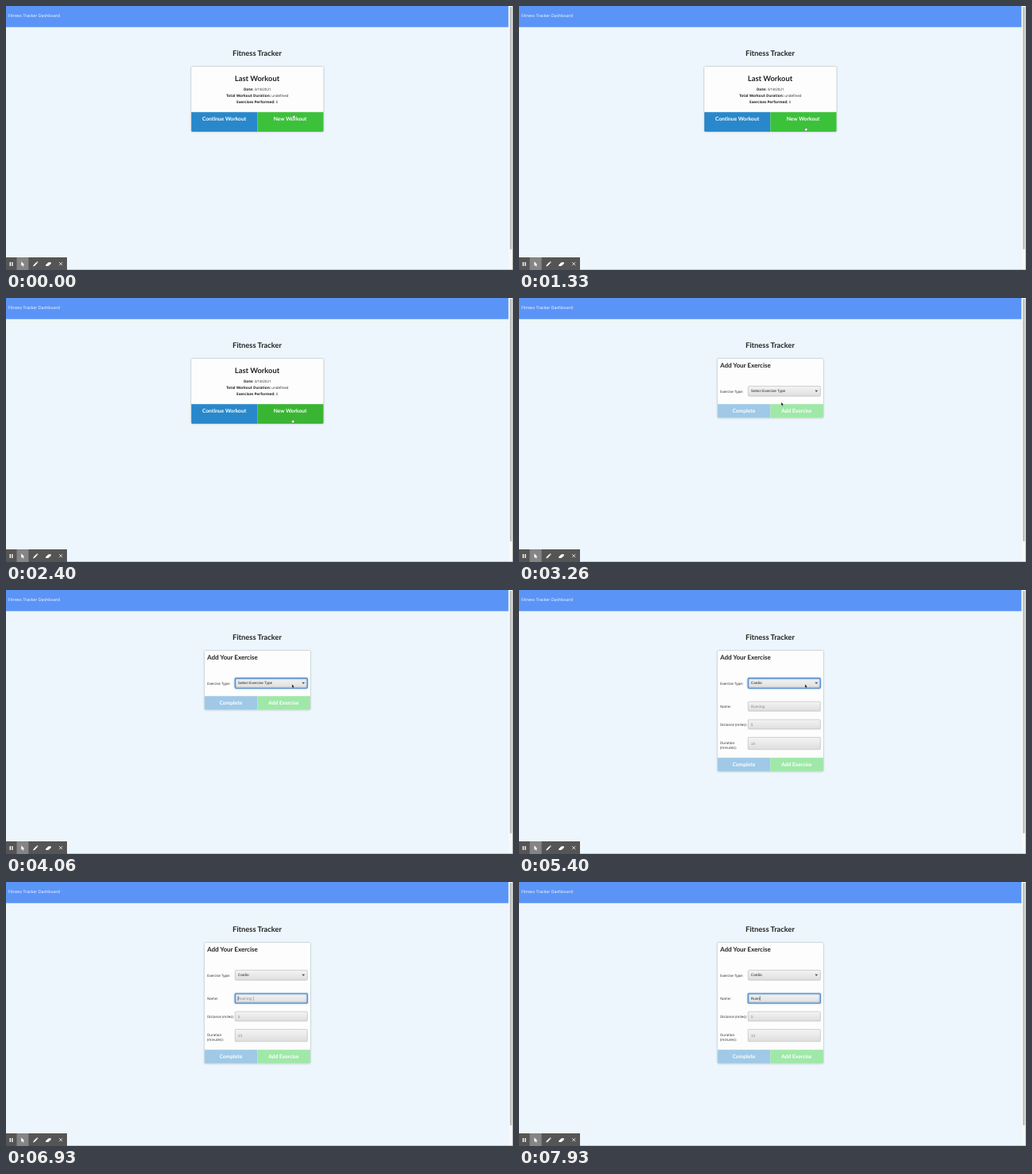
An HTML page that plays this animation: 640 by 334 pixels, repeating every 8 s.

```html
<!DOCTYPE html>
<html lang="en">
<head>
<meta charset="utf-8">
<title>Fitness Tracker</title>
<style>
html, body { margin: 0; width: 100%; height: 100%; overflow: hidden; background: #ecf6fc; }
svg { display: block; width: 640px; height: 334px; }
text { font: 4.45px "Open Sans", sans-serif; fill: #222; text-rendering: geometricPrecision; }
.mid { text-anchor: middle; }
.h1, .h2, .btn { font-family: Lato, sans-serif; font-weight: 700; }
.h1 { font-size: 9.33px; }
.h2 { font-size: 8px; }
.btn { font-size: 6.7px; fill: #fff; }
.bold { font-size: 4.67px; font-weight: 700; }
.nav { font-size: 5.27px; fill: #fff; }
.field { font: 4.67px "Liberation Sans", Arial, sans-serif; }
.hint { fill: #8a8a8a; }
.card { fill: #fdfdfd; filter: drop-shadow(0 .6px .9px #0005); }
.box { fill: url(#grey); stroke: #b4b4b4; stroke-width: .6; }
.focus { fill: none; stroke: #4a86c8; stroke-width: 1.1; filter: drop-shadow(0 0 .8px #5b9bd5); }
</style>
</head>
<body>
<svg viewBox="0 0 640 334">
  <defs>
    <linearGradient id="grey" x2="0" y2="1">
      <stop stop-color="#f4f4f4"/><stop offset="1" stop-color="#dedede"/>
    </linearGradient>
  </defs>
  <rect width="640" height="334" fill="#ecf6fc"/>
  <rect width="634.5" height="26.7" fill="#5b94f7"/>
  <text class="nav" x="3" y="14">Fitness Tracker Dashboard</text>
  <text class="h1 mid" x="317" y="62.8">Fitness Tracker</text>

  <g id="summary">
    <rect class="card" x="234" y="77" width="166.7" height="82" rx="1.3"/>
    <text class="h1 mid" x="317" y="94.5">Last Workout</text>
    <text class="mid" x="317.2" y="106.7"><tspan class="bold">Date:</tspan> 3/18/2021</text>
    <text class="mid" x="317.2" y="114.7"><tspan class="bold">Total Workout Duration:</tspan> undefined</text>
    <text class="mid" x="317.2" y="122.7"><tspan class="bold">Exercises Performed:</tspan> 0</text>
    <path d="M234 134.3h83.3V159h-82a1.3 1.3 0 0 1-1.3-1.3z" fill="#2988cb"/>
    <path id="create" d="M317.3 134.3h83.4v23.4a1.3 1.3 0 0 1-1.3 1.3h-82.1z"/>
    <text class="btn mid" x="275.5" y="145.3">Continue Workout</text>
    <text class="btn mid" x="358.7" y="145.3">New Workout</text>
  </g>

  <g id="form">
    <rect id="panel" class="card" x="250.7" y="77" width="133.3" rx="1.3"/>
    <text class="h2" x="254" y="88">Add Your Exercise</text>
    <text x="254" y="119.7">Exercise Type:</text>
    <rect class="box" x="289.2" y="111.6" width="91.2" height="12.6" rx="1.4"/>
    <rect id="selectFocus" class="focus" x="289.2" y="111.6" width="91.2" height="12.6" rx="1.4"/>
    <text id="kind" class="field" x="292.8" y="119.4"></text>
    <path d="M373.4 116.8h4l-2 2.3z" fill="#555"/>
    <g id="cardio">
      <text x="254" y="149.1">Name:</text>
      <text x="254" y="171.8">Distance (miles):</text>
      <text x="254" y="194.6">Duration</text>
      <text x="254" y="200.7">(minutes):</text>
      <rect class="box" x="289.2" y="141.2" width="91.2" height="12" rx=".8"/>
      <rect class="box" x="289.2" y="164" width="91.2" height="12" rx=".8"/>
      <rect class="box" x="289.2" y="186.4" width="91.2" height="15.4" rx=".8"/>
      <rect id="nameFocus" class="focus" x="289.2" y="141.2" width="91.2" height="12" rx=".8"/>
      <text id="name" class="field" x="292.8" y="148.9"></text>
      <path id="caret" d="M0 144.4v5.6" stroke="#222" stroke-width=".6"/>
      <text class="field hint" x="292.8" y="171.6">5</text>
      <text class="field hint" x="292.8" y="195.8">10</text>
    </g>
    <g id="actions">
      <path d="M250.7 0h66.6v17.2h-65.3a1.3 1.3 0 0 1-1.3-1.3z" fill="#9fc9e7"/>
      <path d="M317.3 0H384v15.9a1.3 1.3 0 0 1-1.3 1.3h-65.4z" fill="#9fe8a8"/>
      <text class="btn mid" x="283.8" y="11">Complete</text>
      <text class="btn mid" x="350.4" y="11">Add Exercise</text>
    </g>
  </g>

  <path d="M634.5 0H640v334h-5.5z" fill="#f8f8f8"/>
  <rect x="636" y="1" width="2.6" height="307" rx="1.3" fill="#c0c0c0"/>
  <path d="M639.6 0v334M0 333.7h640" stroke="#999" stroke-width=".6"/>

  <path d="M0 318h77v16H0z" fill="#555"/>
  <path d="M13.5 318h15v16h-15z" fill="#858585"/>
  <g fill="#fff">
    <path d="M4.6 324h1.4v5H4.6zM7.2 324h1.4v5H7.2z"/>
    <path d="M19.3 323.2v5.8l1.3-1.2 1 2 .9-.4-.9-2h1.8z"/>
    <path d="M34.3 329.4l.4-1.7 3.7-3.7 1.3 1.3-3.7 3.7zM38.8 323.6l.6-.6 1.3 1.3-.6.6z"/>
    <path d="M50.2 327.4l3.4-3.1h3.2v1.6l-3.4 3.1h-3.2z"/>
    <path d="M67.2 324.2l4 4m0-4l-4 4" stroke="#fff" stroke-width=".8"/>
  </g>

  <circle id="ring" cx="312.6" cy="148.8" r="10.6" fill="none" stroke="#d0566a" stroke-width="1.4"/>
  <g id="pointer">
    <path id="hand" d="M-.5-1.6q.6-.5 1 0V-.4l1.5.4v1.6L1.2 2.9H-.9L-2 .8l.4-.5 1.1.6z" fill="#fff" stroke="#333" stroke-width=".35"/>
    <path id="arrow" d="M0-1.7v4.4l1-.9.8 1.6.7-.3-.7-1.5h1.3z" fill="#111" stroke="#fff" stroke-width=".25"/>
    <path id="beam" d="M-.6-2h1.2M0-2v4M-.6 2h1.2" fill="none" stroke="#777" stroke-width=".4"/>
  </g>
</svg>
<script>
const LOOP = 8000, FORM = 2460, CHOSEN = 5400, CLICK = 5930;
const KEYS = [7330, 7500, 7670, 7830];
const PATH = [
  [60, 363, 139], [860, 362, 155], [2600, 362, 155], [3260, 331, 133.5],
  [3800, 361, 121], [5400, 361, 121], [5900, 312.5, 147.5]
];
const $ = id => document.getElementById(id);
const show = (id, on) => $(id).style.display = on ? "" : "none";

function pointerAt(t) {
  const i = PATH.findIndex(p => p[0] > t);
  if (i === 0) return PATH[0].slice(1);
  if (i < 0) return PATH.at(-1).slice(1);
  const [t0, x0, y0] = PATH[i - 1], [t1, x1, y1] = PATH[i];
  const u = (t - t0) / (t1 - t0), e = u * u * (3 - 2 * u);
  return [x0 + (x1 - x0) * e, y0 + (y1 - y0) * e];
}

function draw(now) {
  const t = now % LOOP;
  const chosen = t >= CHOSEN, focused = t >= CLICK;
  const buttonsY = chosen ? 212.3 : 134.3;

  show("summary", t < FORM);
  show("form", t >= FORM);
  $("create").setAttribute("fill", t >= 2330 ? "#3ab533" : "#3cc13b");

  $("panel").setAttribute("height", buttonsY + 17.2 - 77);
  $("actions").setAttribute("transform", `translate(0 ${buttonsY})`);
  $("kind").textContent = chosen ? "Cardio" : "Select Exercise Type";
  show("selectFocus", t >= 3930 && !focused);
  show("cardio", chosen);
  show("nameFocus", focused);

  const typed = "Running".slice(0, KEYS.filter(k => t >= k).length);
  const name = $("name");
  name.textContent = typed || "Running";
  name.classList.toggle("hint", !typed);
  const width = typed && chosen ? name.getComputedTextLength() : 0;
  $("caret").setAttribute("transform", `translate(${293 + width} 0)`);
  show("caret", focused && (typed || (t - CLICK) % 1000 < 500));

  show("ring", focused && t < 6200);
  show("pointer", !typed);
  show("hand", t < FORM);
  show("arrow", t >= FORM && t < 5800);
  show("beam", t >= 5800);
  $("pointer").setAttribute("transform", `translate(${pointerAt(t)})`);
  requestAnimationFrame(draw);
}
requestAnimationFrame(draw);
</script>
</body>
</html>
```
